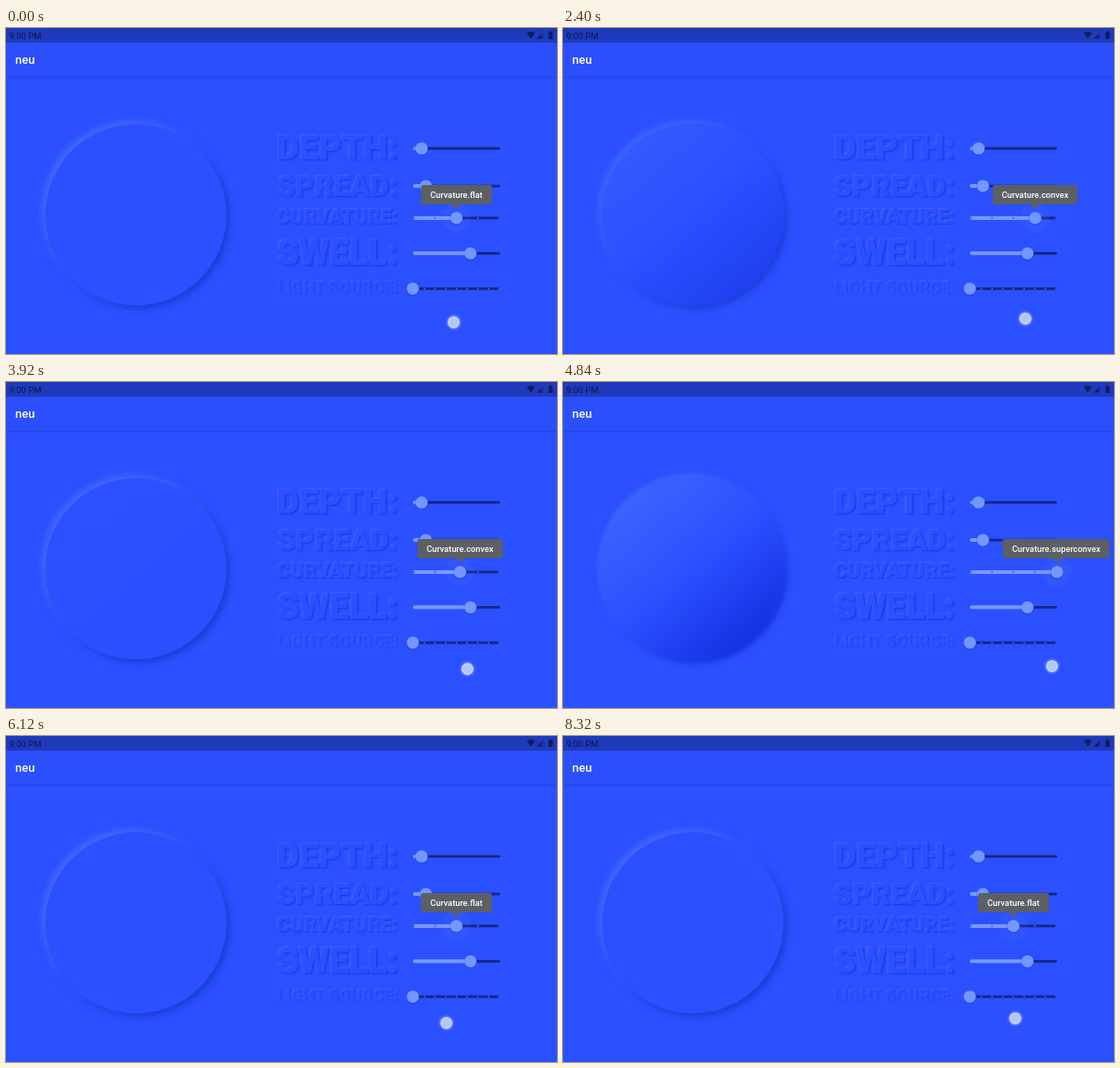
Write an HTML page that moves like this. It is 600 px wide and 355 px high and loops after 8.36 s.

```html
<!DOCTYPE html>
<html lang="en">
<head>
<meta charset="utf-8">
<title>neu</title>
<style>
  html, body { margin: 0; width: 100%; height: 100%; overflow: hidden; }
  body { position: relative; background: #2b50ff; font-family: Roboto, sans-serif; }
  div, svg { position: absolute; }

  #status { left: 0; top: 0; width: 600px; height: 16px; background: #1f3abb; }
  #clock { left: 3.5px; top: 2.5px; font-size: 9.5px; line-height: 11px; color: #0b174e; white-space: nowrap; }
  #bar { left: 0; top: 16px; width: 600px; height: 36.5px; background: #2b4ffa; box-shadow: 0 1px 1.5px #1939c7a0; }
  #title { left: 10px; top: 11px; font-size: 13px; line-height: 16px; font-weight: 500; color: #fff; }

  #disc { left: 43px; top: 105px; width: 197px; height: 197px; border-radius: 50%; background: #2b50ff;
    box-shadow: 3.5px 3.5px 7px #1a37cbd0, -3.5px -3.5px 7px #456cff; }
  #face { border-radius: 50%; }

  .name { left: 295px; transform: translateY(-50%); line-height: 1; font-weight: 900; white-space: nowrap;
    color: #2b50ff; text-shadow: .032em .032em .05em #1b3ad6, -.032em -.032em .05em #4067ff; }

  #tip { top: 171px; height: 21px; padding: 0 10px; border-radius: 2px; background: #5c5f63; color: #fff;
    font-size: 9.3px; line-height: 21px; font-weight: 500; white-space: nowrap; }
  #arrow { top: 191.5px; width: 10px; height: 5.5px; margin-left: -5px; background: #5c5f63;
    clip-path: polygon(0 0, 100% 0, 50% 100%); }
  #touch { width: 13px; height: 13px; margin: -6.5px; border-radius: 50%;
    background: radial-gradient(#b2c6fa 45%, #cfdbff 65%); box-shadow: 0 0 3px 0.5px #b9cbffc0; }
</style>
</head>
<body>
<div id="status">
  <div id="clock">9:00 PM</div>
  <svg width="600" height="16" fill="#101d62">
    <path d="M567 5.6Q571.5 2 576 5.6L571.5 11.4Z"/>
    <path d="M578 11.6H585V4.6Z" opacity=".45"/>
    <path d="M578 11.6H582.5V7.1Z"/>
    <path d="M590.7 4.4H592V3.5H594V4.4H595.3V12H590.7Z"/>
  </svg>
</div>
<div id="bar"><div id="title">neu</div></div>
<div id="disc"><div id="face"></div></div>
<svg id="sliders" width="600" height="355"></svg>
<div id="tip"></div>
<div id="arrow"></div>
<div id="touch"></div>

<script>
const LOOP = 8360, LEFT = 443, WIDTH = 95, STEP = WIDTH / 4, NAME_WIDTH = 132;
const CURVES = ['superconcave', 'concave', 'flat', 'convex', 'superconvex'];
const $ = id => document.getElementById(id);

const ROWS = [
  { text: 'DEPTH:', value: 0.1 },
  { text: 'SPREAD:', value: 0.15 },
  { text: 'CURVATURE:', value: 0.5, divisions: 4, held: true },
  { text: 'SWELL:', value: 0.66 },
  { text: 'LIGHT SOURCE:', value: 0, divisions: 8 },
];

// where the finger turns or rests: time, x, y
const STOPS = [
  [0, 487, 320], [1000, 486, 320], [1400, 510, 321], [2250, 510, 316],
  [2980, 450, 319], [3360, 488, 315], [4800, 532, 309], [5200, 532, 312],
  [6750, 450, 312], [7250, 450, 310.5], [8320, 492, 307],
];

const smooth = k => k * k * (3 - 2 * k);

function finger(t) {
  const time = Math.min(Math.max(t, 0), 8320);
  const next = Math.max(1, STOPS.findIndex(stop => stop[0] >= time));
  const [t0, x0, y0] = STOPS[next - 1];
  const [t1, x1, y1] = STOPS[next];
  const k = smooth((time - t0) / (t1 - t0));
  return [x0 + (x1 - x0) * k, y0 + (y1 - y0) * k];
}

const curveAt = t => Math.round((finger(t)[0] - LEFT) / STEP);

// the stepped value, eased linearly over the given span
function eased(t, span) {
  const count = 30;
  let sum = 0;
  for (let i = 0; i < count; i++) sum += curveAt(t - span * i / count);
  return sum / count;
}

function shape(tag, attrs) {
  const el = document.createElementNS('http://www.w3.org/2000/svg', tag);
  for (const key in attrs) el.setAttribute(key, attrs[key]);
  return $('sliders').appendChild(el);
}

function slider(y, { value, divisions = 0, held }) {
  shape('rect', { x: LEFT, y: y - 1.4, width: WIDTH, height: 2.8, rx: 1.4, fill: '#142780' });
  const active = shape('rect', { x: LEFT, y: y - 2, height: 4, rx: 2, fill: '#7799ff' });
  const ticks = [];
  for (let i = 0; divisions && i <= divisions; i++) {
    const cx = LEFT + 1 + (WIDTH - 2) * i / divisions;
    ticks.push([cx, shape('circle', { cx, cy: y, r: 0.9 })]);
  }
  const ripple = shape('circle', { cy: y, r: 16, fill: '#7c9dff', opacity: held ? 0.07 : 0 });
  const shade = shape('circle', { cy: y + 0.8, r: 7.2, fill: '#1534bd', opacity: 0.35 });
  const thumb = shape('circle', { cy: y, r: 6.7, fill: '#7397ff' });
  const move = x => {
    active.setAttribute('width', Math.max(0, x - LEFT));
    for (const el of [ripple, shade, thumb]) el.setAttribute('cx', x);
    for (const [cx, el] of ticks) el.setAttribute('fill', cx < x ? '#2b50ef' : '#5576e6');
  };
  move(LEFT + WIDTH * value);
  return move;
}

// every name is as wide as its column; its height sets the row height
let rowTop = 109;
const movers = ROWS.map(row => {
  const name = document.createElement('div');
  name.className = 'name';
  name.textContent = row.text;
  name.style.fontSize = '100px';
  document.body.insertBefore(name, $('sliders'));
  const size = 100 * NAME_WIDTH / name.offsetWidth;
  const height = Math.max(32, size * 1.172);
  const middle = rowTop + height / 2;
  rowTop += height;
  name.style.fontSize = size + 'px';
  name.style.top = middle - 0.5 + 'px';
  return slider(middle, row);
});

// lighter for positive amounts, darker for negative ones
function tone(amount) {
  const [r, g, b] = amount > 0 ? [10, 11, 0] : [14, 18, 17];
  return `rgb(${43 + r * amount}, ${80 + g * amount}, ${255 + b * amount})`;
}

function draw(t) {
  const [x, y] = finger(t);
  const thumb = LEFT + STEP * eased(t, 75);
  movers[2](thumb);

  const bend = eased(t, 160) - 2;
  const soft = 1.3 * Math.max(0, bend);
  const face = $('face').style;
  face.background = `linear-gradient(140deg, ${tone(bend)} 8%, ${tone(0)}, ${tone(-bend)} 92%)`;
  face.inset = -soft + 'px';
  face.filter = `blur(${soft}px)`;

  const tip = $('tip');
  tip.textContent = 'Curvature.' + CURVES[curveAt(t)];
  const width = tip.offsetWidth;
  tip.style.left = Math.min(thumb - width / 2, 595 - width) + 'px';
  $('arrow').style.left = thumb + 'px';
  $('touch').style.left = x + 'px';
  $('touch').style.top = y + 'px';
}

const start = performance.now();
function frame() {
  draw((performance.now() - start) % LOOP);
  requestAnimationFrame(frame);
}
frame();
</script>
</body>
</html>
```
